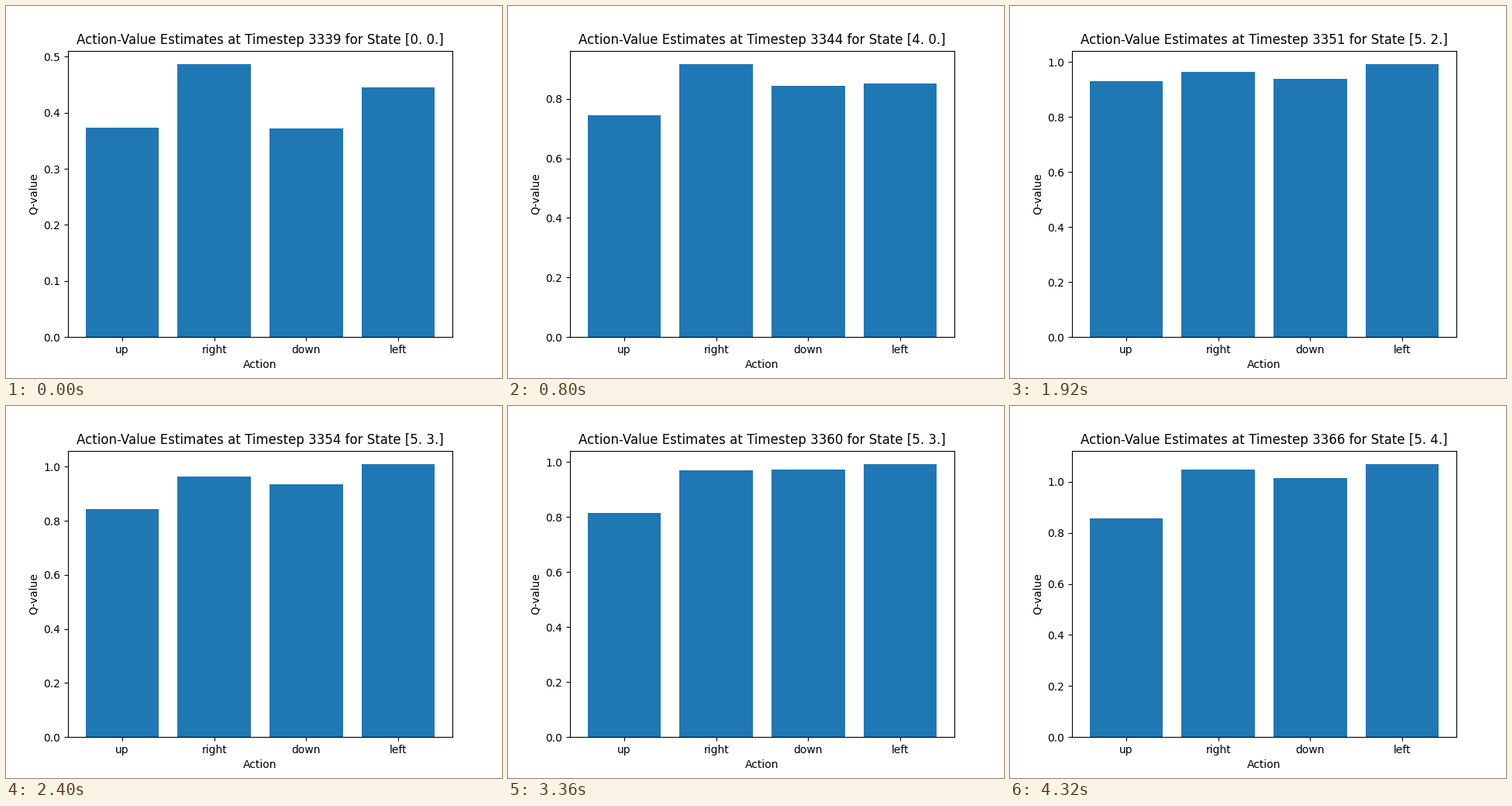
Write a matplotlib script that moves like this. It is 640 px wide and 480 px high and loops after 4.48 s.

```python
import numpy as np
import matplotlib.pyplot as plt
from matplotlib.animation import FuncAnimation

STEPS = 28
INTERVAL = 160
START = 3339
ACTIONS = ["up", "right", "down", "left"]

# a few key points of the learning curve of each action
KEY_STEPS = [0, 5, 9, 12, 17, 21, 27]
CURVES = [
    (0.3734, 0.7445, 0.723, 0.930, 0.784, 0.814, 0.857),
    (0.4864, 0.9155, 0.932, 0.963, 0.964, 0.968, 1.048),
    (0.3718, 0.8430, 0.826, 0.938, 0.932, 0.972, 1.015),
    (0.4453, 0.8510, 0.887, 0.991, 1.0215, 0.991, 1.069),
]


def q_values(step):
    return [np.interp(step, KEY_STEPS, curve) for curve in CURVES]


def state(step):
    """Grid cell of the agent: along the bottom edge, then up the right side."""
    x = round(np.interp(step, [0, 5, 9, 12], [0, 4, 4, 5]))
    y = round(np.interp(step, [9, 12, 17, 27], [0, 2, 3, 4]))
    return f"[{x}. {y}.]"


fig, ax = plt.subplots(figsize=(6.4, 4.8), dpi=100)


def draw(step):
    ax.clear()
    ax.bar(ACTIONS, q_values(step))
    ax.set_xlabel("Action")
    ax.set_ylabel("Q-value")
    ax.set_title(f"Action-Value Estimates at Timestep {START + step} "
                 f"for State {state(step)}")


anim = FuncAnimation(fig, draw, frames=STEPS, init_func=lambda: draw(0),
                     interval=INTERVAL, repeat=True, repeat_delay=0)

plt.show()
```
